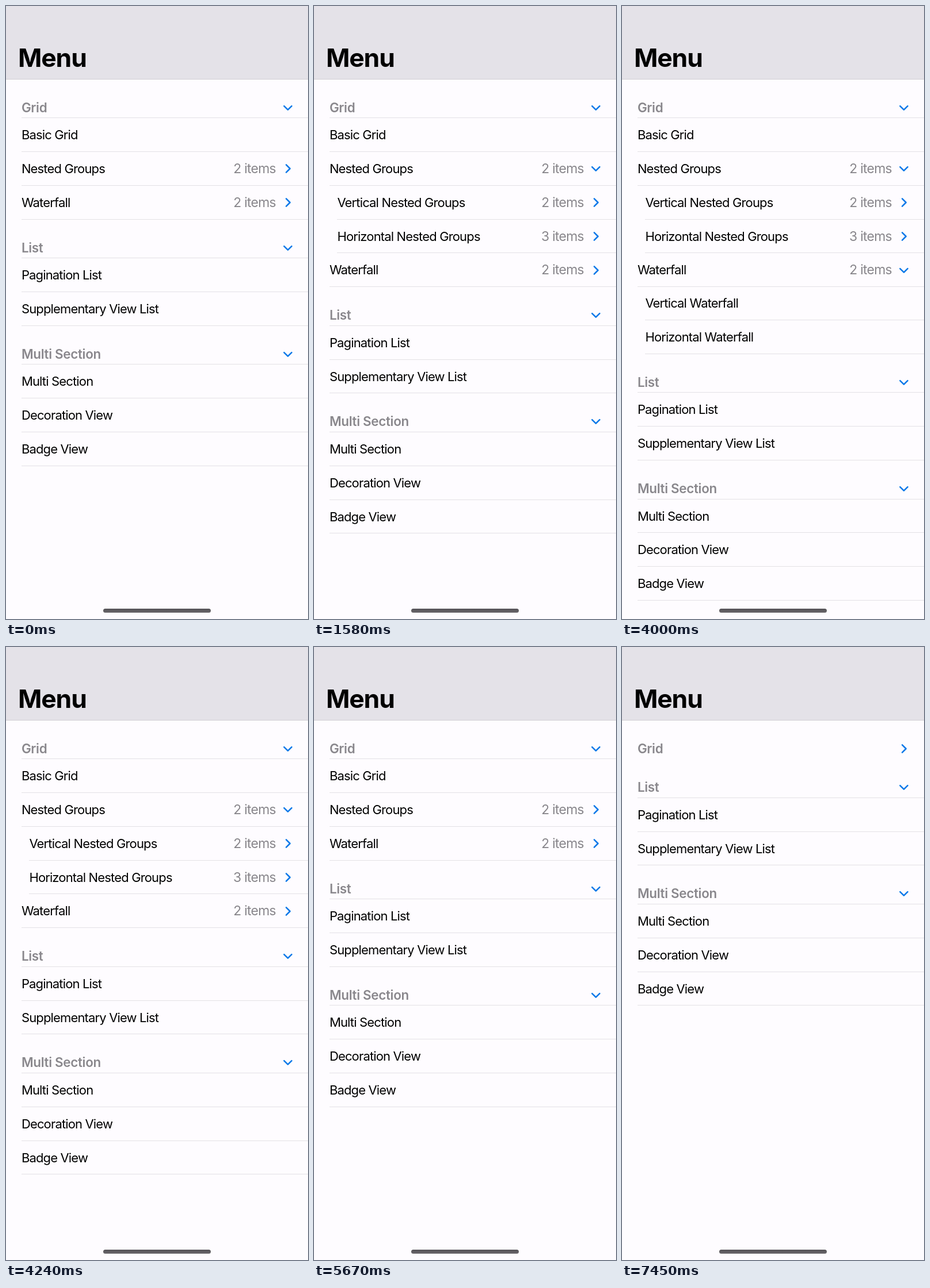
These frames come from a looping animation (525x1067 px, 8000 ms). An HTML page:

```html
<!DOCTYPE html>
<html lang="en">
<head>
<meta charset="utf-8">
<title>Menu</title>
<style>
  html, body { margin: 0; width: 100%; height: 100%; overflow: hidden; }
  body {
    position: relative;
    background: #fefcff;
    color: #000;
    font: 22px/58px Inter, sans-serif;
    font-optical-sizing: none;
    letter-spacing: -.85px;
    white-space: nowrap;
  }
  nav {
    box-sizing: border-box;
    height: 127.6px;
    background: #e4e2e8;
    border-bottom: 1px solid #d0ced4;
  }
  h1 {
    position: absolute; left: 21px; top: 60px; margin: 0;
    font-size: 44.4px; line-height: 61px; font-weight: 700; letter-spacing: -1.1px;
  }
  .header, .row { position: relative; flex: none; padding-left: 26.9px; }
  .header {
    height: 67.6px;
    font-size: 22.4px; line-height: 97px; font-weight: 600; letter-spacing: -.3px;
    color: #89878c;
  }
  .row { height: 58.8px; }
  .child { padding-left: 40.4px; }
  .line {
    position: absolute; left: 27px; right: 0; bottom: 0; height: 1px;
    background: #e3e1e5;
  }
  .child .line { left: 40px; }
  .count {
    position: absolute; right: 56px; top: 0;
    font-size: 23px; letter-spacing: -.75px; color: #89878c;
  }
  .group { display: flex; flex-direction: column; justify-content: flex-end; overflow: hidden; }
  .chevron {
    position: absolute; left: 480px; top: 19.4px; width: 20px; height: 20px;
    fill: none; stroke: #0a78e8; stroke-width: 2.5;
    stroke-linecap: round; stroke-linejoin: round;
  }
  .header .chevron { top: 39px; }
  .home {
    position: absolute; left: 169px; top: 1049px; width: 187px; height: 7px;
    border-radius: 3.5px;
    background: linear-gradient(#545256, #69666b);
  }
</style>
</head>
<body>
<nav><h1>Menu</h1></nav>
<main></main>
<div class="home"></div>
<script>
const LOOP = 8000, ROW = 58.8;

const menu = [
  { label: 'Grid', items: [
    { label: 'Basic Grid' },
    { label: 'Nested Groups', count: 2, items: [
      { label: 'Vertical Nested Groups', count: 2 },
      { label: 'Horizontal Nested Groups', count: 3 }
    ] },
    { label: 'Waterfall', count: 2, items: [
      { label: 'Vertical Waterfall' },
      { label: 'Horizontal Waterfall' }
    ] }
  ] },
  { label: 'List', items: [
    { label: 'Pagination List' },
    { label: 'Supplementary View List' }
  ] },
  { label: 'Multi Section', items: [
    { label: 'Multi Section' },
    { label: 'Decoration View' },
    { label: 'Badge View' }
  ] }
];

// lead: share of the easing already covered by the first visible step
const toggles = [
  { label: 'Nested Groups', from: 1330, to: 1580, steps: 9, lead: .055, open: true },
  { label: 'Waterfall', from: 3000, to: 3210, steps: 8, lead: .185, open: true },
  { label: 'Waterfall', from: 4000, to: 4240, steps: 9, lead: .055, open: false },
  { label: 'Nested Groups', from: 5450, to: 5670, steps: 8, lead: .185, open: false },
  { label: 'Grid', from: 7240, to: 7450, steps: 8, lead: .185, open: false }
];

function add(parent, className, text = '') {
  const element = document.createElement('div');
  element.className = className;
  element.textContent = text;
  return parent.appendChild(element);
}

function addChevron(parent) {
  parent.insertAdjacentHTML('beforeend',
    '<svg class="chevron" viewBox="-10 -10 20 20"><path d="M-2.9-6.6 3.7 0-2.9 6.6"/></svg>');
  return parent.lastElementChild.firstElementChild;
}

function build(node, parent, depth) {
  const cell = add(parent, ['header', 'row', 'row child'][depth], node.label);
  node.depth = depth;
  node.line = add(cell, 'line');
  if (node.count) add(cell, 'count', node.count + ' items');
  if (node.count || !depth) node.chevron = addChevron(cell);
  if (node.items) {
    node.group = add(parent, 'group');
    node.items.forEach(item => build(item, node.group, depth + 1));
  }
}

function openness(node, time) {
  let open = node.depth ? 0 : 1;
  for (const t of toggles) {
    if (t.label !== node.label || time < t.from) continue;
    const last = t.steps - 1;
    const step = Math.min(last, Math.floor((time - t.from) / (t.to - t.from) * last + 1e-6));
    const u = t.lead + (1 - t.lead) * step / last;
    const eased = u * u * (3 - 2 * u);
    open = t.open ? eased : 1 - eased;
  }
  return open;
}

// Lays out a node's group and returns its visible height.
function update(node, time) {
  if (!node.items) return 0;
  const open = openness(node, time);
  const full = node.items.reduce((sum, item) => sum + ROW + update(item, time), 0);
  const height = full * open;
  node.group.style.height = height + 'px';
  node.chevron.setAttribute('transform', `rotate(${90 * open})`);
  if (!node.depth) node.line.hidden = open === 0;
  return height;
}

const main = document.querySelector('main');
menu.forEach(section => build(section, main, 0));

const start = performance.now();
function draw() {
  const time = (performance.now() - start) % LOOP;
  menu.forEach(section => update(section, time));
  requestAnimationFrame(draw);
}
draw();
</script>
</body>
</html>
```
